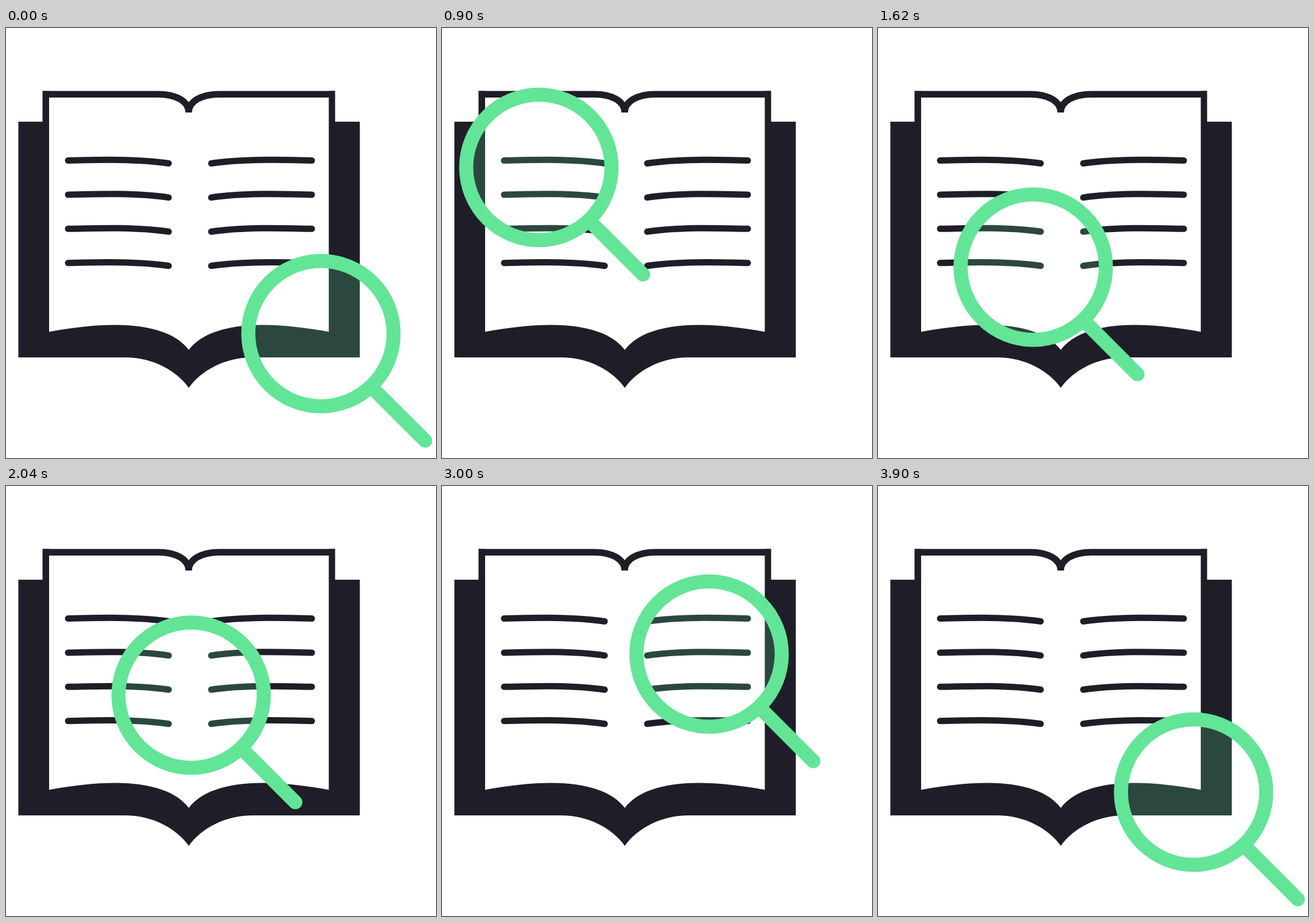
An HTML page with a canvas for the animation above (4.2 s loop, 748x748 px).

```html
<!DOCTYPE html>
<html lang="en">
<head>
<meta charset="utf-8">
<title>Book search</title>
<style>
  html, body { margin: 0; width: 100%; height: 100%; overflow: hidden; background: #fff; }
  canvas { display: block; width: 748px; height: 748px; }
</style>
</head>
<body>
<canvas id="stage" width="748" height="748"></canvas>
<script>
const ctx = document.getElementById('stage').getContext('2d');
const INK = '#1f1e28', TINTED = '#2c473f', GREEN = '#62e597';
const LOOP = 4200, STEP = 60;

const cover = new Path2D(`M21.5 163H63.5V109.5H75V528.5
  C115 521 155 516.5 190 516.5C255 516.5 298 533 318 560
  C338 533 381 516.5 446 516.5C481 516.5 521 521 561.5 528.5
  V109.5H572.5V163H615.5V573H429C381 573 339 596 318 626
  C297 596 255 573 207 573H21.5Z`);
const topEdge = new Path2D(`M64 115.2H265C295 115.2 317.8 127 317.8 147
  M572 115.2H371C341 115.2 317.8 127 317.8 147`);
const textLines = new Path2D();
for (let row = 0; row < 4; row++) {
  const y = 230.5 + row * 59.4;
  for (const side of [-1, 1]) {
    const x = d => 320 + side * d;
    textLines.moveTo(x(212), y);
    textLines.bezierCurveTo(x(155), y - 1.5, x(90), y - 3, x(37), y + 5);
  }
}

// Lens stops, with the time each one is left and the time the next is reached.
const stops = [
  { x: 549, y: 532.5, leave: -32, arrive: 881 },
  { x: 168.5, y: 242.5, leave: 1019, arrive: 1621 },
  { x: 270, y: 416, leave: 1753, arrive: 2537 },
  { x: 446, y: 239.5, leave: 2659, arrive: 3879 }
];

function lensAt(time) {
  const t = time >= LOOP + stops[0].leave ? time - LOOP : time;
  let i = stops.length - 1;
  while (i > 0 && t < stops[i].leave) i--;
  const from = stops[i], to = stops[(i + 1) % stops.length];
  const p = Math.min(1, (t - from.leave) / (from.arrive - from.leave));
  const eased = (1 - Math.cos(Math.PI * p)) / 2;
  return { x: from.x + (to.x - from.x) * eased, y: from.y + (to.y - from.y) * eased };
}

function stroke(path, color, width, cap) {
  ctx.strokeStyle = color;
  ctx.lineWidth = width;
  ctx.lineCap = cap;
  ctx.stroke(path);
}

function drawBook(color) {
  ctx.fillStyle = color;
  ctx.fill(cover);
  stroke(topEdge, color, 11.5, 'butt');
  stroke(textLines, color, 11, 'round');
}

function drawLens({ x, y }) {
  const ring = new Path2D();
  ring.arc(x, y, 126.4, 0, Math.PI * 2);
  ctx.save();
  ctx.clip(ring);
  ctx.fillStyle = '#fff';
  ctx.fill(ring);
  drawBook(TINTED);
  ctx.restore();
  stroke(ring, GREEN, 24.5, 'butt');

  const handle = new Path2D();
  handle.moveTo(x + 90, y + 95);
  handle.lineTo(x + 181.3, y + 186.3);
  stroke(handle, GREEN, 24.5, 'round');
}

function render(now) {
  const time = Math.floor((now % LOOP) / STEP) * STEP;
  ctx.fillStyle = '#fff';
  ctx.fillRect(0, 0, 748, 748);
  drawBook(INK);
  drawLens(lensAt(time));
}

let start;
function tick(now) {
  start ??= now;
  render(now - start);
  requestAnimationFrame(tick);
}
render(0);
requestAnimationFrame(tick);
</script>
</body>
</html>
```
